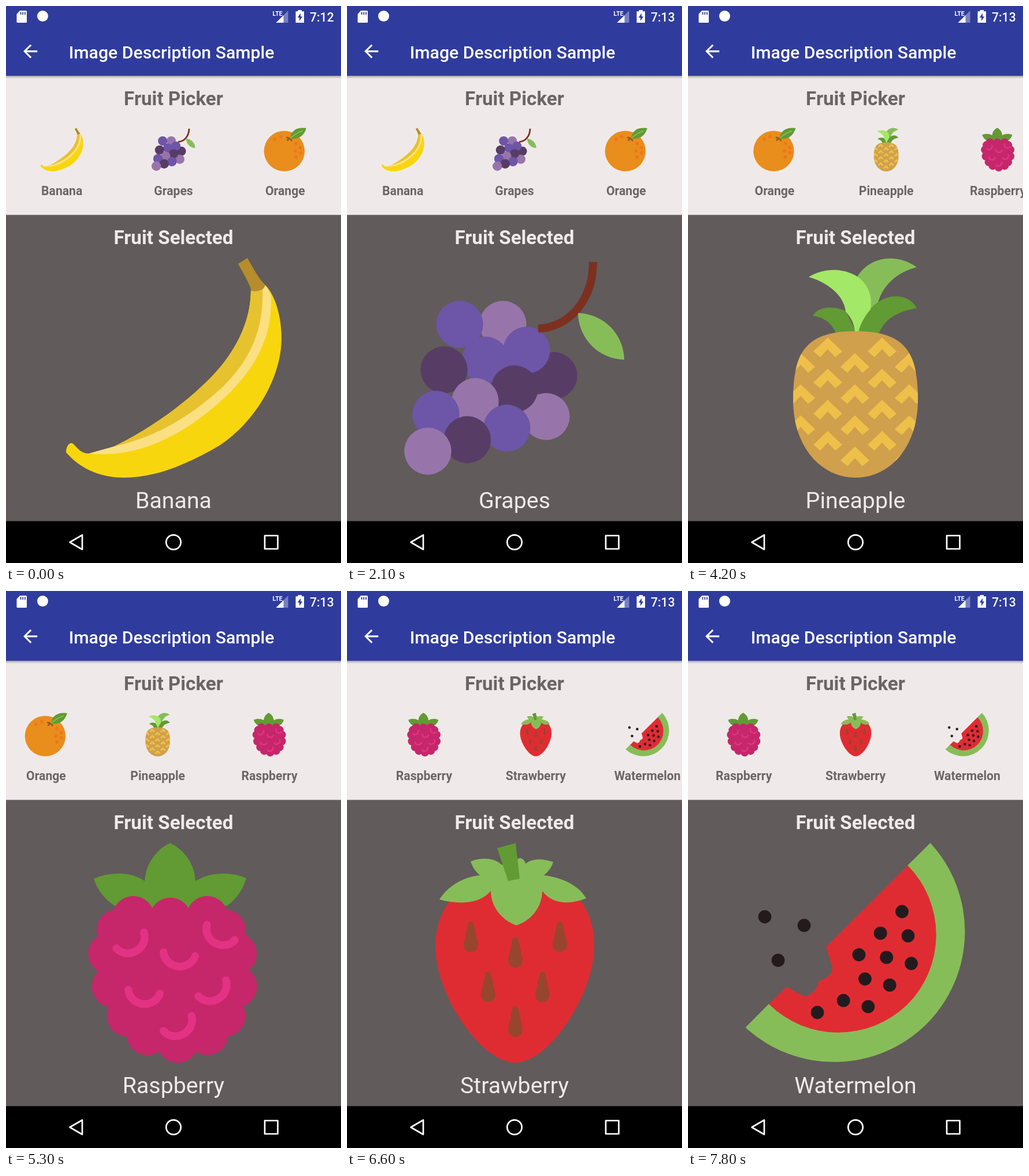
An HTML page that plays this animation: 580 by 966 pixels, repeating every 8100 ms.

```html
<!DOCTYPE html>
<html lang="en">
<head>
<meta charset="utf-8">
<title>Fruit Picker</title>
<style>
html, body { margin: 0; width: 100%; height: 100%; overflow: hidden; background: #000; }
svg { display: block; width: 580px; height: 966px; font-family: Roboto, sans-serif; }
.mid { text-anchor: middle; }
.head { font-size: 33.2px; font-weight: 700; }
.item { font-size: 21.15px; font-weight: 700; fill: #6b6665; }
.name { font-size: 39.3px; fill: #efebe9; }
</style>
</head>
<body>
<svg viewBox="0 0 580 966">
  <defs id="defs"></defs>
  <rect width="580" height="363" fill="#efeae9"/>
  <text class="mid head" x="290" y="171.5" fill="#6b6665">Fruit Picker</text>
  <g id="row"></g>

  <rect y="362.300" width="580" height="532" fill="#615b5b"/>
  <text class="mid head" x="290" y="413" fill="#efebe9">Fruit Selected</text>
  <use id="big"/>
  <text id="name" class="mid name" x="290" y="870.800"></text>

  <linearGradient id="shade" x2="0" y2="1">
    <stop stop-color="#000" stop-opacity=".3"/><stop offset="1" stop-color="#000" stop-opacity="0"/>
  </linearGradient>
  <rect y="121" width="580" height="5" fill="url(#shade)"/>
  <rect width="580" height="121" fill="#2f3c9d"/>
  <g fill="#fff">
    <path d="M24 8H34.500Q36 8 36 9.500V27.500Q36 29 34.500 29H20Q18.500 29 18.500 27.500V14Z"/>
    <path d="M25.500 10.500v4.500M29.200 10.500v4.500M32.900 10.500v4.500" stroke="#2f3c9d" stroke-width="1.800"/>
    <circle cx="63.500" cy="17.500" r="9.500"/>
    <text x="461.500" y="16.500" font-size="10.500" font-weight="700">LTE</text>
    <path d="M488.500 8V29H467.500Z" opacity=".35"/>
    <path d="M480.500 16V29H467.500Z"/>
    <path d="M505.500 7h6.500v2.300h4V29h-14.500V9.300h4Z"/>
    <path d="M510 12.500L504.800 20H508V26L513.200 18.300H510Z" fill="#2f3c9d"/>
    <text id="clock" x="526" y="26.500" font-size="21.150" font-weight="500"></text>
    <path transform="translate(24 60.500) scale(1.510)" d="M20 11H7.830l5.590-5.590L12 4l-8 8 8 8 1.410-1.410L7.830 13H20z"/>
    <text x="108.750" y="90.500" font-size="30.200" font-weight="500">Image Description Sample</text>
  </g>

  <rect y="893.400" width="580" height="73"/>
  <g fill="none" stroke="#fff" stroke-width="2.700" stroke-linejoin="round">
    <path d="M110.500 930L132 917.500V942.500Z"/>
    <circle cx="290" cy="930" r="12.700"/>
    <rect x="448" y="918.500" width="22.500" height="23"/>
  </g>
</svg>
<script>
const $ = id => document.getElementById(id);
const shape = (fill, d) => `<path fill="${fill}" d="${d}"/>`;
const line = (color, width, d) =>
  `<path fill="none" stroke="${color}" stroke-width="${width}" stroke-linecap="round" d="${d}"/>`;
const dots = (fill, r, pts) =>
  pts.map(([x, y]) => `<circle cx="${x}" cy="${y}" r="${r}" fill="${fill}"/>`).join('');
const stamps = (mark, pts) =>
  pts.map(([x, y, turn = 0]) => `<g transform="translate(${x} ${y}) rotate(${turn})">${mark}</g>`).join('');
const count = (n, f) => Array.from({ length: n }, (_, i) => f(i));
const mirror = pts => [...pts, ...pts.map(([x, y]) => [-x, y]).reverse()];

const LEAF = '#87bd58', GREEN = '#629a33', RED = '#df2c33';

function banana() {
  const top = 'M424 492C424 550 395 605 349 650C300 698 242 737 187 764';
  return shape('#f8d60e', top + 'L144 776C127 777 121 761 114 758C109 757 104 764 104 774C126 800 160 818 205 818C253 818 305 800 370 762C432 721 477 644 477 576C477 545 469 505 449 484Z')
    + shape('#e7c22f', top + 'L190 764C262 747 320 711 375 661C423 614 449 558 446 488Z')
    + shape('#fae082', 'M144 776C240 786 323 733 388 670C439 617 461 568 459 502L449 484L444 491C447 560 423 614 375 661C320 711 262 747 187 764Z')
    + shape('#b58d2a', 'M402 447L418 437C428 455 437 472 449 484Q447 491 440 493Q433 496 425 494C420 477 410 463 402 447Z');
}

function grapes() {
  const color = { l: '#9775aa', m: '#6d55a8', d: '#573c66' };
  // each row rises from its first berry, front berries overlap those behind
  const row = (x, y, gap, rise, kinds) => [...kinds].map((k, i) =>
    dots(color[k], 40.7, [[x + gap * i, y - rise * i]])).reverse().join('');
  return row(195, 552, 75, 0, 'ml')
    + row(154, 708, 68, 22, 'mldd').replace(/^.*?\/>/, '')
    + dots(color.d, 40.7, [[358, 641]])
    + row(140, 772, 68.3, 20, 'ldml')
    + row(168, 631, 71.5, 17, 'dmm')
    + row(154, 708, 68, 22, 'mld')
    + row(140, 772, 68.3, 20, 'ldm')
    + '<path fill="none" stroke="#7d3020" stroke-width="14" d="M426 444C426 510 384 558 331 559.500"/>'
    + shape(LEAF, 'M400 532.500A82 82 0 0 1 480 613.500A82 82 0 0 1 400 532.500Z');
}

function orange() {
  return dots('#e98d1c', 177.7, [[282.7, 640.5]])
    + dots('#ec7819', 14.8, [[200, 537], [251.5, 515], [385, 574], [422, 611], [377, 640.5], [424, 656.5], [385, 692]])
    + line('#985b1f', 14, 'M305 522Q338 525 345 549M310 545Q317 533 335 529')
    + shape(GREEN, 'M332 530C344 462 390 428 475 440C452 512 402 542 332 530Z')
    + line('#8abf54', 8.5, 'M337 526Q383 483 439 465');
}

function pineapple() {
  const body = 'M182 684C182 602 202 564 290 564C378 564 398 602 398 684C398 764 350 818 290 818C230 818 182 764 182 684Z';
  const marks = count(20, i => {
    const col = i % 5 - 2, lift = col % 2 ? 27 : 0;
    return [289 + 47 * col, 602 - lift + 54 * Math.floor(i / 5)];
  });
  return shape(LEAF, 'M293 470C312 437 358 426 396 453C355 464 335 490 328 518L316 532Z')
    + shape(GREEN, 'M216 537C226 521 250 519 273 529L292 567H256C248 549 236 541 216 537Z')
    + shape(GREEN, 'M294 567C303 532 326 509 352 504C374 501 389 511 396 524C361 530 340 544 331 567Z')
    + shape('#a3e866', 'M209 470C238 452 274 455 297 472C315 487 319 508 316 526C306 538 299 550 295 565H289C288 551 282 540 273 530C270 503 244 480 209 470Z')
    + shape('#d0a04c', body)
    + `<clipPath id="body"><path d="${body}"/></clipPath><g clip-path="url(#body)">`
    + stamps(shape('#eec04a', 'M0 0L25 24L13 34L0 20L-13 34L-25 24Z'), marks) + '</g>';
}

function raspberry() {
  // a symmetric ring of bumps, leaning a little
  const ring = mirror([[0, -107], [64, -110], [93, -87], [110, -46], [107, 11], [84, 62], [52, 94], [0, 107]])
    .map(([x, y]) => [291 + x + y * .06, 675 + y]);
  const smile = line('#e33283', 13.5, 'M-27.500 0A28 26 0 0 0 27.500 0');
  return shape(GREEN, 'M284 437C309 449 327 474 328 503C355 486 391 487 416 498C410 519 398 534 384 545L284 570L192 548C174 538 159 521 152 499C180 487 216 486 240 503C242 474 259 449 284 437Z')
    + dots('#c5276a', 36, ring) + shape('#c5276a', 'M' + ring.join('L') + 'Z')
    + stamps(smile, [[215, 606, -30], [300, 630, 7], [372, 592, 29], [239, 695, 7], [357, 689, -30], [297, 750, -28]]);
}

function strawberry() {
  const seed = shape('#98452e', 'M0 0C4 0 5 4 6 9L12.500 39A12.600 12.600 0 1 1 -12.500 39L-6 9C-5 4 -4 0 0 0Z');
  return shape(RED, 'M180 535C162 556 153 585 153 617C153 700 232 818 291 818C350 818 428 700 428 615C428 582 419 556 403 536L340 500H250Z')
    + shape(LEAF, 'M160 535C178 507 208 495 230 493C222 486 217 478 214 469C238 460 258 465 268 475L300 463Q308 466 309 473C322 463 340 464 357 470C354 480 348 487 341 493C372 497 401 510 414 533C380 546 353 541 338 520C338 549 318 572 293 580C268 571 249 548 249 520C233 540 200 546 160 535Z')
    + shape(GREEN, 'M260 446L292 437L299 499L279 503Z')
    + stamps(seed, mirror([[77, 573], [0, 600], [47, 660], [0, 720]]).map(([x, y]) => [291.5 + x, y]));
}

function watermelon() {
  const diagonal = (x, y, n) => count(n, i => [x - 37.3 * i, y + 37.4 * i]);
  return shape(LEAF, 'M419.500 437A227 227 0 0 1 414 750A227 227 0 0 1 99.500 757L140 716L260 740L400 600L380 476Z')
    + shape(RED, 'M380.500 476A171.500 171.500 0 0 1 380 717A171.500 171.500 0 0 1 140 716.500L170 687C182 691 192 700 203 703C215 700 223 690 227 676C238 673 246 668 250 657C248 644 243 632 239 617Z')
    + dots('#231a1e', 11.4, [
      ...diagonal(370.5, 556, 3), ...diagonal(381, 598, 4), ...diagonal(386.5, 646, 3),
      [133, 565], [201, 580], [156, 640.5], [224, 731]]);
}

const fruits = [banana, grapes, orange, pineapple, raspberry, strawberry, watermelon];
const names = fruits.map(f => f.name[0].toUpperCase() + f.name.slice(1));
const PITCH = 193.33, LOOP = 8100, SCROLL = 400;

$('defs').innerHTML = fruits.map((f, i) => `<g id="fruit${i}">${f()}</g>`).join('');
$('row').innerHTML = names.map((n, i) => {
  const x = 96.7 + PITCH * i;
  return `<use href="#fruit${i}" transform="translate(${x - 37.75} 211.300) scale(.198) translate(-99.500 -437)"/>`
    + `<text class="mid item" x="${x}" y="328.300">${n}</text>`;
}).join('');

// time of each pick, ms the scroll is already under way
const picks = [[0, 0], [1900, 0], [2900, 88], [4200, 91], [5300, 12], [6600, 113], [7700, 0]];
const ease = p => 1 - (1 - Math.min(p, 1)) ** 5;
// the picked fruit moves to the centre where the row allows it
const page = i => Math.max(0, Math.min(i - 1, fruits.length - 3));

function draw(now) {
  const t = Math.floor((now % LOOP) / 100) * 100;
  const i = picks.filter(([at]) => at <= t).length - 1;
  const [at, lead] = picks[i];
  const from = page(i - 1);
  const left = from + (page(i) - from) * ease((t - at + lead) / SCROLL);
  $('row').setAttribute('transform', `translate(${-left * PITCH} 0)`);
  $('big').setAttribute('href', '#fruit' + i);
  $('name').textContent = names[i];
  $('clock').textContent = t < 1400 ? '7:12' : '7:13';
}

const start = performance.now();
function tick() {
  draw(performance.now() - start);
  requestAnimationFrame(tick);
}
tick();
</script>
</body>
</html>
```
